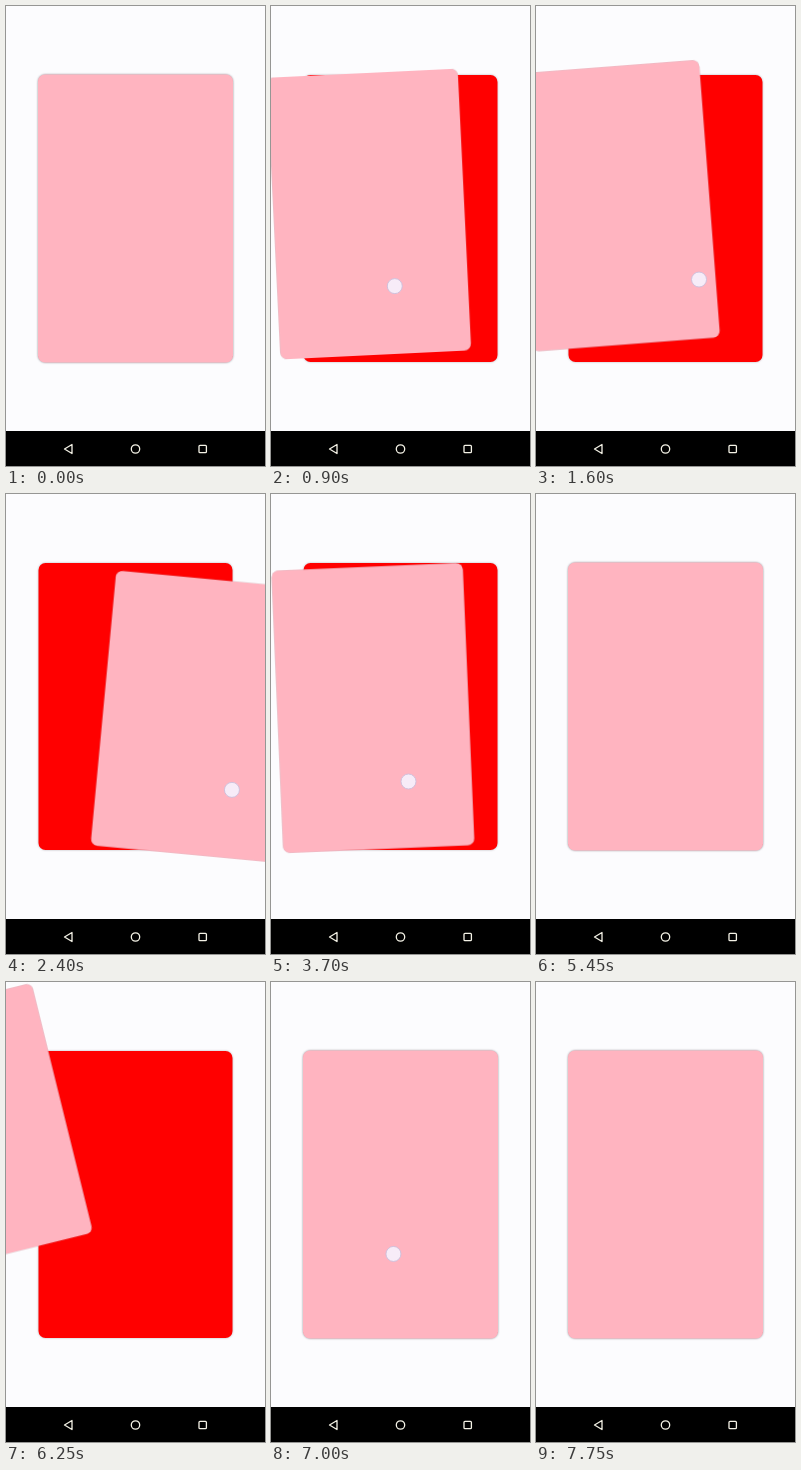
An HTML page for the animation above (7.8 s loop, 259x460 px).

```html
<!DOCTYPE html>
<html lang="en">
<head>
<meta charset="utf-8">
<title>Swipe deck</title>
<style>
  html, body { margin: 0; width: 100%; height: 100%; overflow: hidden; background: #fcfcfe; }
  svg { display: block; width: 259px; height: 460px; }
  .card { filter: drop-shadow(0 .5px .8px rgba(60, 50, 60, .35)); }
</style>
</head>
<body>
<svg viewBox="0 0 259 460">
  <rect class="card" x="32.5" y="69" width="194" height="287" rx="7" fill="#f00"/>
  <g id="top"><rect class="card" x="32" y="68.5" width="195" height="288" rx="7" fill="#ffb4c0"/></g>
  <circle id="touch" r="7.5" fill="#f6f0fc" fill-opacity=".93" stroke="#cbbfdc" stroke-width=".9"/>
  <rect y="425" width="259" height="35"/>
  <g fill="none" stroke="#f4f2e6" stroke-width="1.3" stroke-linejoin="round">
    <path d="M66 438.5v9l-7.5-4.5z"/>
    <circle cx="129.5" cy="443" r="4.2"/>
    <rect x="193" y="439.3" width="7.4" height="7.4" rx="1"/>
  </g>
</svg>
<script>
const LOOP = 7800, TOUCH_LEAD = 80;
const DEG_PER_PX = 0.088, SHRINK_PER_PX = 0.00068;
const card = document.getElementById('top');
const touch = document.getElementById('touch');

const smooth = u => u * u * (3 - 2 * u);
const linear = u => u;
const easeIn = u => u * u;
const easeOut = u => 1 - (1 - u) ** 3;

// A quick drag to the left, then a throw off the stage.
const swipe = (start, end, x, y, dragY, flyX, flyY) => ({
  start, end, x, y, release: start + 350,
  keys: [[start, 0, 0], [start + 350, -85, dragY, easeIn], [end - 60, flyX, flyY, linear]]
});

// Keys: time, dx, dy, easing into the key.
const gestures = [
  {
    start: 550, end: 4300, release: 3750, x: 165, y: 286,
    keys: [
      [550, 0, 0], [1200, -56, -8, smooth], [1550, -62, -13, smooth],
      [1800, 50, -12, smooth], [2400, 61, 10, smooth], [2900, 60, 8, smooth],
      [3660, -27.5, 1.5, smooth], [3750, -27.5, 1.5, linear], [4300, 0, 0, easeOut]
    ]
  },
  swipe(4800, 5450, 150, 280, -8, -330, -30),
  swipe(5800, 6550, 140, 280, -22, -330, -170),
  swipe(7000, 7750, 127, 272, -1, -340, 150)
];

function offsetAt(keys, t) {
  const i = keys.findIndex(k => k[0] > t);
  if (i < 0) return keys[keys.length - 1].slice(1, 3);
  if (i === 0) return [0, 0];
  const [t0, x0, y0] = keys[i - 1], [t1, x1, y1, ease] = keys[i];
  const u = ease((t - t0) / (t1 - t0));
  return [x0 + (x1 - x0) * u, y0 + (y1 - y0) * u];
}

function draw(t) {
  const g = gestures.find(g => t >= g.start && t < g.end);
  const [dx, dy] = g ? offsetAt(g.keys, t) : [0, 0];
  const scale = 1 - Math.abs(dx) * SHRINK_PER_PX;
  card.setAttribute('transform', `translate(${129.5 + dx} ${212.5 + dy}) ` +
    `rotate(${dx * DEG_PER_PX}) scale(${scale}) translate(-129.5 -212.5)`);

  const touching = g && t < g.release;
  touch.style.display = touching ? '' : 'none';
  if (touching) {
    const [tx, ty] = offsetAt(g.keys, Math.min(t + TOUCH_LEAD, g.release));
    touch.setAttribute('cx', g.x + tx);
    touch.setAttribute('cy', g.y + ty);
  }
}

const origin = performance.now();
function tick() {
  draw((performance.now() - origin) % LOOP);
  requestAnimationFrame(tick);
}
tick();
</script>
</body>
</html>
```
